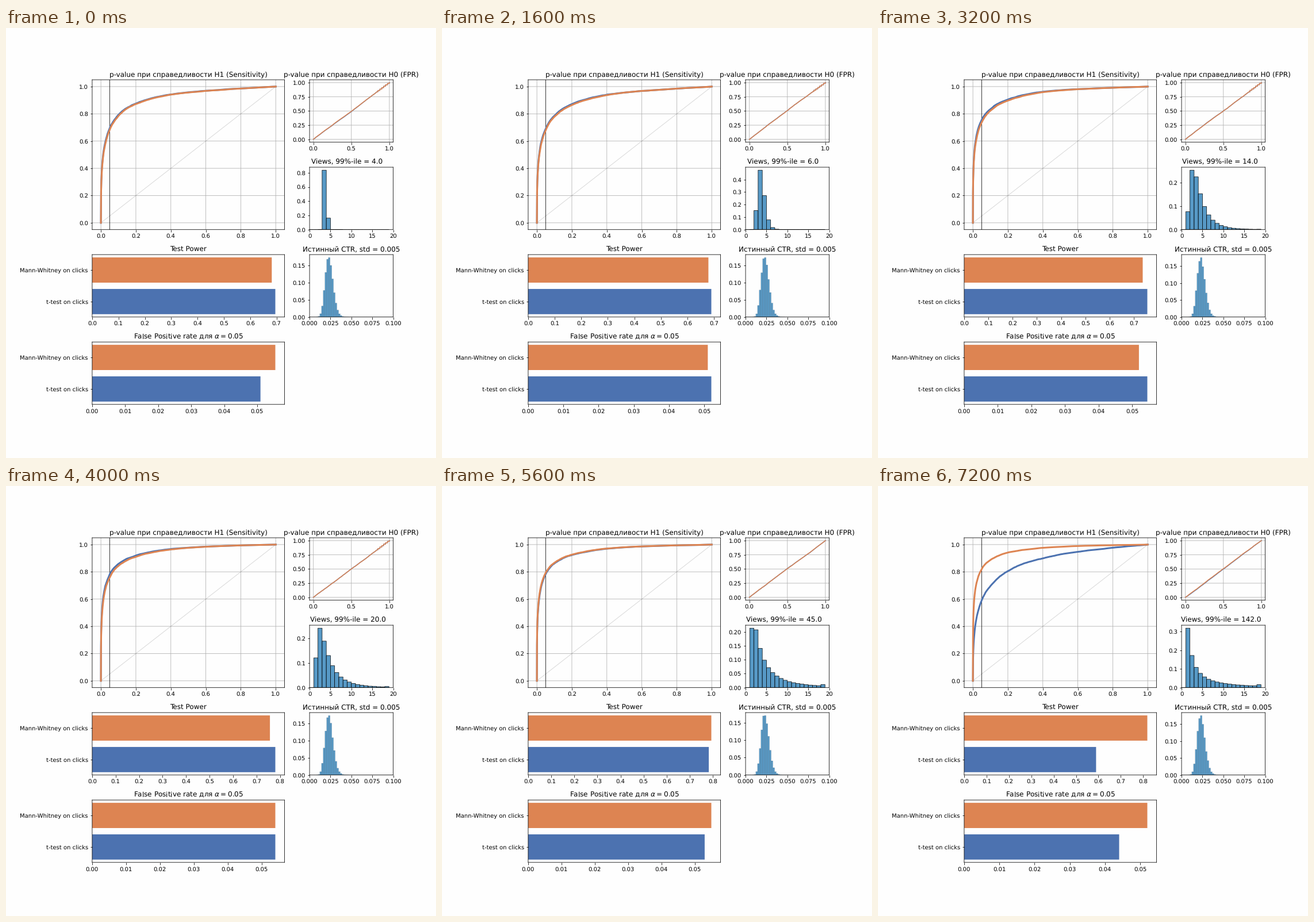
Recreate the animation shown at these times as a matplotlib script. Size 748 by 748 pixels, loop 8000 ms.

```python
import math

import matplotlib.pyplot as plt
import numpy as np
from matplotlib.animation import FuncAnimation

# Unhinted text and unsnapped lines keep their true widths at this low resolution
plt.rcParams.update({
    "font.family": "DejaVu Sans",
    "text.hinting": "none",
    "path.snap": False,
    "figure.facecolor": "#fefefe",
    "axes.facecolor": "#fefefe",
})

SIZE = 748
BLUE, ORANGE, HIST = "#4C72B0", "#DD8452", (0.122, 0.467, 0.706, 0.75)
TESTS = ["t-test on clicks", "Mann-Whitney on clicks"]
ALPHA = 0.05
SPREAD = 1.06  # the test statistic varies a little more than a standard normal

# One entry per step: spread of views, 99th percentile, power and FPR of each test
SIGMA = [0.1, 0.2, 0.3, 0.5, 0.7, 0.85, 1.0, 1.2, 1.5, 1.7]
PCTILE = [4, 5, 6, 9, 14, 20, 28, 45, 91, 142]
POWER_T = [0.695, 0.677, 0.690, 0.7065, 0.755, 0.780, 0.805, 0.782, 0.729, 0.5895]
POWER_MW = [0.6815, 0.670, 0.679, 0.6905, 0.736, 0.757, 0.776, 0.793, 0.8105, 0.8185]
FPR_T = [0.051, 0.0545, 0.052, 0.0495, 0.0545, 0.054, 0.056, 0.053, 0.0495, 0.044]
FPR_MW = [0.0555, 0.0495, 0.051, 0.0525, 0.052, 0.054, 0.0565, 0.055, 0.054, 0.052]

erf = np.vectorize(math.erf)


def phi(z):
    return 0.5 * (1 + erf(np.asarray(z, float) / math.sqrt(2)))


Z = np.linspace(-6, 6, 4001)
PHI = phi(Z)
X = np.linspace(0, 1, 2001)
X_Z = np.interp(1 - X / 2, PHI, Z)  # two-sided critical values


def bridge(rng):
    walk = np.cumsum(rng.normal(size=X.size)) / math.sqrt(X.size)
    walk -= walk[0]
    return walk - X * walk[-1]


def pinned(base, noise, value):
    """Noisy distribution curve that passes exactly through (ALPHA, value)."""
    y = base + np.interp(base, X, noise)
    miss = np.interp(ALPHA, X, y) - value
    y = y - np.interp(X, [0, ALPHA, 1], [0, miss, 0])
    y = np.maximum.accumulate(np.clip(y, 0, 1))
    y[0], y[-1] = 0, 1
    return y


def power_curve(power):
    critical = np.interp(1 - ALPHA / 2, PHI, Z)
    shift = critical + SPREAD * np.interp(power, PHI, Z)
    return phi((shift - X_Z) / SPREAD) + phi((-shift - X_Z) / SPREAD)


def views_hist(sigma):
    cdf = phi((np.log(np.arange(1, 20)) - 1) / sigma)
    mass = np.diff(cdf, prepend=0)
    mass[-2] += mass[-1]  # the last bin holds both 18 and 19
    return np.concatenate([[0], mass[:-1]]) / cdf[-1]


def ctr_hist(rng):
    fine = (np.arange(49 * 40) + 0.5) / (49 * 40) * 0.1
    pdf = np.exp(24 * np.log(fine / 0.0228) + 1029 * np.log(1 - fine))
    mass = pdf.reshape(49, 40).sum(axis=1)
    return rng.multinomial(60000, mass / mass.sum()) / 60000


fig = plt.figure(figsize=(10.389, 10.389), dpi=72)
nudge = 0.3 / SIZE
grid = fig.add_gridspec(4, 3, left=0.2 + nudge, right=0.9 + nudge,
                        bottom=0.125 - nudge, top=0.88 - nudge,
                        wspace=0.3, hspace=0.4)
ax_h1 = fig.add_subplot(grid[:2, :2])
ax_h0 = fig.add_subplot(grid[0, 2])
ax_views = fig.add_subplot(grid[1, 2])
ax_ctr = fig.add_subplot(grid[2, 2])
ax_power = fig.add_subplot(grid[2, :2])
ax_fpr = fig.add_subplot(grid[3, :2])


def draw_bars(ax, values, title):
    ax.barh(TESTS, values, color=[BLUE, ORANGE])
    ax.set_title(title)


def draw_hist(ax, edges, heights, right, width):
    ax.bar(edges[:-1], heights, np.diff(edges), align="edge",
           facecolor=HIST, edgecolor="black", linewidth=width)
    ax.set_xlim(0, right)


def frame_curves(ax, title):
    ax.set_xlim(-0.05, 1.05)
    ax.set_ylim(-0.05, 1.05)
    ax.grid(True)
    ax.set_title(title)


def update(i):
    rng = np.random.default_rng(40 + i)
    for ax in fig.axes:
        ax.clear()

    shared = bridge(rng)
    noises = [0.009 * shared + 0.003 * bridge(rng) for _ in TESTS]
    ax_h1.plot([0, 1], [0, 1], color="black", alpha=0.15, lw=1)
    ax_h1.axvline(ALPHA, color="black", lw=0.8)
    for power, noise, color in zip((POWER_T[i], POWER_MW[i]), noises, (BLUE, ORANGE)):
        ax_h1.plot(X, pinned(power_curve(power), noise, power), color=color, lw=3)
    frame_curves(ax_h1, "p-value при справедливости H1 (Sensitivity)")

    shared = bridge(rng)
    noises = [0.009 * shared + 0.003 * bridge(rng) for _ in TESTS]
    # Few distinct click counts make large p-values coarse
    steps = 1 - np.round((1 - X) / 0.025) * 0.025
    coarse = np.where(X > 0.84, steps, X) if SIGMA[i] <= 1 else X
    ax_h0.plot(coarse, pinned(X, noises[0], FPR_T[i]), color=BLUE, lw=1.5)
    ax_h0.plot(coarse, pinned(X, noises[1], FPR_MW[i]), color=ORANGE, lw=1.5)
    frame_curves(ax_h0, "p-value при справедливости H0 (FPR)")

    draw_hist(ax_views, np.arange(20), views_hist(SIGMA[i]), 20, 0.7)
    label = f"{PCTILE[i]:.1f}"
    blanks = 7 - len(label)  # the number sits left in a seven-character field
    ax_views.set_title(f"Views, 99%-ile = {label}", x=0.5 - blanks * 1.907 / 145.44)

    draw_hist(ax_ctr, np.linspace(0, 0.1, 50), ctr_hist(rng), 0.1, 0.1)
    ax_ctr.set_title("Истинный CTR, std = 0.005")

    draw_bars(ax_power, [POWER_T[i], POWER_MW[i]], "Test Power")
    draw_bars(ax_fpr, [FPR_T[i], FPR_MW[i]],
              r"False Positive rate для $\alpha=0.05$")
    return []


anim = FuncAnimation(fig, update, frames=10, interval=800, repeat=True,
                     repeat_delay=0, blit=False)
plt.show()
```
